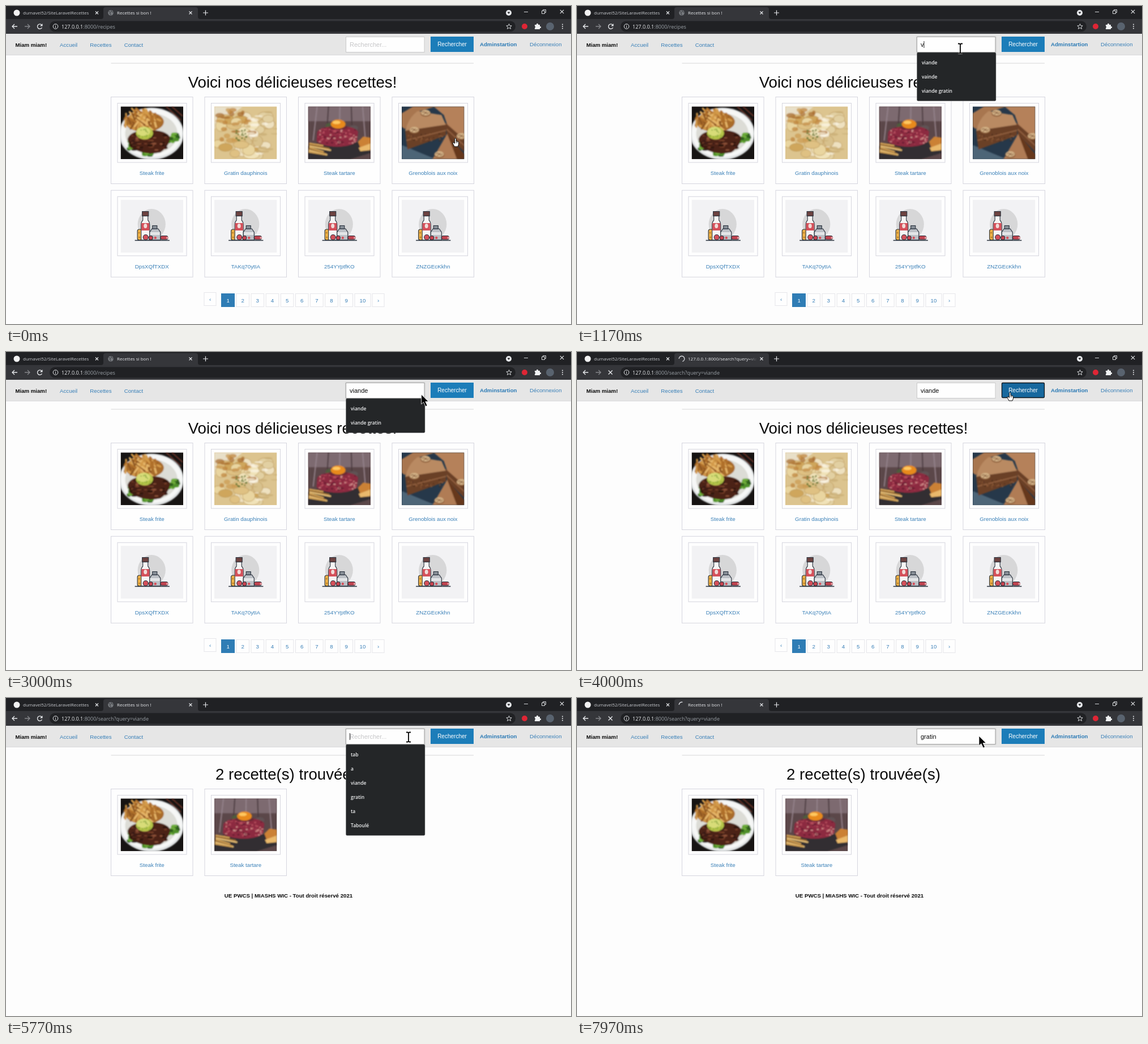
These frames come from a looping animation (998 by 561 pixels, 8000 ms). An HTML page:

```html
<!DOCTYPE html>
<html lang="fr">
<head>
<meta charset="utf-8">
<title>Recettes</title>
<style>
html, body { margin: 0; width: 100%; height: 100%; overflow: hidden; background: #fdfdfd; }
svg { display: block; }
#stage { width: 998px; height: 561px; font-family: "Liberation Sans", Arial, sans-serif; }
.ui { font-family: "Open Sans", "Noto Sans", sans-serif; }
.mid { text-anchor: middle; }
.b { font-weight: 700; }
text { white-space: pre; }
</style>
</head>
<body>
<svg id="stage" viewBox="0 0 998 561"></svg>
<script>
const LOOP = 8000;
const LINK = '#3a80b8', INK = '#0b0b0b', LIGHT = '#e8eaed';

const rect = (x, y, w, h, fill, more = '') => `<rect x="${x}" y="${y}" width="${w}" height="${h}" fill="${fill}" ${more}/>`;
const oval = (x, y, rx, ry, fill, more = '') => `<ellipse cx="${x}" cy="${y}" rx="${rx}" ry="${ry}" fill="${fill}" ${more}/>`;
const dot = (x, y, r, fill, more) => oval(x, y, r, r, fill, more);
const shape = (d, fill, more = '') => `<path d="${d}" fill="${fill}" ${more}/>`;
const line = (d, color, w = 1, more = '') => shape(d, 'none', `stroke="${color}" stroke-width="${w}" ${more}`);
const text = (x, y, s, size, fill, more = '') => `<text x="${x}" y="${y}" font-size="${size}" fill="${fill}" ${more}>${s}</text>`;
const group = (id, body, more = '') => `<g id="${id}" ${more}>${body}</g>`;
const repeat = (n, fn) => Array.from({ length: n }, (_, i) => fn(i)).join('');

function random(seed) {
  return (a = 0, b = 1) => {
    seed = (seed * 16807) % 2147483647;
    return +(a + (b - a) * seed / 2147483647).toFixed(1);
  };
}
const pick = (list, i) => list[i % list.length];

// Dishes, each on a 110 x 93 field
const photo = (back, body) => rect(0, 0, 110, 93, back) + `<g filter="url(#soft)">${body}</g>`;

function steakFries() {
  const r = random(91);
  const leaves = (n, x, y) => repeat(n, i => oval(x + r(-8, 8), y + r(-7, 7), r(3, 6), r(2, 4), pick(['#4f8f2a', '#6fae3a', '#2f611d'], i)));
  return photo('#171413', line('M80 0L106 24M90 0L109 17', '#6d3328', 2)
    + oval(54, 48, 57, 46, '#dfe2e3') + oval(54, 47, 54, 43, '#f6f7f6') + oval(54, 48, 46, 36, '#dcdcd6')
    + leaves(14, 92, 55) + leaves(14, 46, 80) + leaves(8, 18, 68)
    + oval(42, 27, 34, 18, '#a96c2b')
    + repeat(64, i => {
      const x = r(8, 62), y = r(3, 36);
      return line(`M${x} ${y}l${r(-6, 18)} ${r(5, 13)}`, pick(['#d39a49', '#b0702a', '#e6b669', '#8f5722'], i), 3.4, 'stroke-linecap="round"');
    })
    + shape('M12 58Q16 43 44 42Q78 40 87 54Q86 70 70 81Q42 87 17 72Z', '#4c2419')
    + repeat(50, i => oval(r(17, 80), r(50, 77), r(2, 5), r(1, 2.2), pick(['#753c28', '#2c130e', '#8d5138', '#3a1a12'], i)))
    + oval(42, 47, 15, 11, '#b5c548') + oval(40, 44, 12, 8, '#d8dc78')
    + repeat(16, () => dot(r(30, 53), r(39, 55), 1, '#759a30')));
}
function gratin() {
  const r = random(37);
  const lump = (x, y, colors, i) => oval(x, y, r(8, 15), r(6, 11), pick(colors, i), 'stroke="#b99455" stroke-width=".8"');
  return photo('#dcc48f', shape('M0 0H50L0 40Z', '#e8dfc8')
    + repeat(16, i => lump(r(50, 106), r(8, 88), ['#eee1c0', '#e2d0a2', '#f3ead3', '#d8c18d'], i))
    + repeat(18, i => lump(r(4, 66), r(12, 86), ['#dfc183', '#e9d5a0', '#cfa65c', '#f0e2b8'], i))
    + repeat(22, i => oval(r(6, 70), r(6, 60), r(3, 9), r(2, 5), pick(['#bd8139', '#cb9850', '#a66a2b'], i), 'opacity=".7"'))
    + repeat(20, i => oval(r(58, 108), r(10, 86), r(4, 9), r(1, 3), pick(['#fbf5e6', '#c7ac73'], i), 'opacity=".7"'))
    + repeat(20, () => dot(r(38, 57), r(40, 60), r(.8, 2), '#6d7b39')));
}
function tartare() {
  const r = random(53);
  return photo('#5b4749', rect(0, 0, 110, 26, '#7d6a70')
    + repeat(7, i => line(`M${i * 20 - 4} 0L${i * 23 - 14} 60`, pick(['#4a393e', '#94828a'], i), 2))
    + shape('M0 70L28 60L104 64L110 82L74 93H0Z', '#302d30')
    + oval(38, 34, 7, 5, '#4d5b3c') + oval(80, 38, 8, 5, '#5f5254')
    + shape('M16 46Q18 36 52 34Q84 35 88 45L86 61Q78 70 52 71Q22 70 15 61Z', '#8c2a40')
    + repeat(110, i => oval(r(18, 85), r(38, 67), r(1, 2.6), r(.8, 1.8), pick(['#b9505f', '#651c30', '#a23b50', '#cf8f8b'], i)))
    + oval(53, 37, 17, 4, '#6d2a35') + oval(53, 31, 13, 8, '#e88a1c') + oval(50, 28, 7, 3, '#ffc85e')
    + repeat(7, i => line(`M${r(0, 6)} ${65 + i * 2.5}l${r(20, 36)} ${r(4, 9)}`, pick(['#d2a256', '#94662f', '#e3bc75'], i), 2.8, 'stroke-linecap="round"'))
    + shape('M88 62L97 53L110 55V65L92 73Z', '#cb8135') + shape('M89 73L110 65V77L92 79Z', '#eab96c'));
}
function walnutCake() {
  const r = random(71);
  const nut = (x, y) => oval(x, y + 1, 9, 6, '#8a5b38') + oval(x, y, 8, 5, '#d8b78b')
    + line(`M${x - 6} ${y}q3 -4 6 0t6 -1M${x - 4} ${y + 3}l7 -5`, '#7d5435', 1.2);
  const crumbs = (n, x, y, w, h) => repeat(n, i => dot(r(x, x + w), r(y, y + h), r(.7, 1.5), pick(['#8d5a38', '#4e2c1a'], i)));
  return photo('#26384a', shape('M0 68L60 93H0Z', '#4d6577')
    + shape('M0 12L20 0H60L26 10L6 40L0 36Z', '#a87650')
    + shape('M56 0H110V58L82 38L74 15Z', '#b5815a') + shape('M76 28L110 58V80L80 50Z', '#6a3f27')
    + shape('M6 43Q12 20 28 8L70 15L78 33Z', '#b98a62') + shape('M6 43L78 32V51L10 76Z', '#6b4128')
    + line('M8 60L78 42M79 40L110 69', '#92603f', 2) + crumbs(40, 12, 46, 60, 16)
    + shape('M80 48L54 93H100Z', '#b07c55') + shape('M80 48L110 84V93H97Z', '#66391f')
    + nut(22, 41) + nut(42, 11) + nut(66, 84) + nut(105, 52));
}
function groceries() {
  const edge = 'stroke="#28313c" stroke-width="1.1"';
  return rect(0, 0, 110, 93, '#f2f2f4') + oval(54.5, 43, 24.5, 27, '#d7d7d8')
    + rect(29.5, 52, 17, 19, '#edb147', `rx="3" ${edge}`) + dot(32.5, 58, 1.5, '#b97f2c') + dot(33, 66, 1.5, '#b97f2c')
    + shape('M39 28H48V36Q51 39 51 44V71H36V44Q36 39 39 36Z', '#f6f5f4', edge)
    + rect(38, 20.5, 11, 8, '#6d4341', edge) + rect(36.5, 41, 14, 13, '#d4505a') + oval(43.5, 46, 3, 4, '#f1dcd9')
    + shape('M51 71V57L55 51H66L70 57V71Z', '#bcc0c6', edge) + rect(56, 45.5, 8, 5.5, '#8b929a', edge)
    + rect(52, 57, 17, 5, '#e4e6e8') + dot(61, 67, 2.2, '#d4505a')
    + dot(44, 66, 4.5, '#d4505a', edge) + dot(53, 67, 3.5, '#c9434f', edge)
    + rect(70, 63.5, 13, 6.5, '#c0434f', `rx="3" ${edge}`) + dot(82, 67, 2, '#e39aa0')
    + line('M25 71.5H86', '#28313c', 1.4);
}

function card(col, row, title, art) {
  const x = 185.5 + col * 165.5, y = 160.5 + row * 164.7;
  const frame = 'stroke="#d5d5de" stroke-width="1"';
  return rect(x, y, 144.5, 153, '#fefefe', frame) + rect(x + 11.5, y + 11, 122, 104.5, '#fefefe', frame)
    + `<svg x="${x + 17}" y="${y + 16.8}" width="110.5" height="93" viewBox="0 0 110 93" preserveAspectRatio="none">${art}</svg>`
    + text(x + 72.3, y + 137.3, title, 9.75, LINK, 'class="mid"');
}
const heading = s => text(506, 144, s, 27.65, INK, 'class="mid"');

function pager() {
  const cell = (x, w, label, y = 507.5) => rect(x - w / 2, y, w, 23, '#fefefe', 'stroke="#e6e6ea"')
    + text(x, y + 15.2, label, 9.7, LINK, 'class="mid"');
  return cell(360.5, 21, '‹', 505.5) + repeat(9, i => cell(392 + i * 26.15, 22.5, i + 1))
    + rect(380, 507, 24, 24, '#2f7db5') + text(392.2, 522.7, 1, 9.7, '#fff', 'class="mid"')
    + cell(630, 28, 10) + cell(657.5, 21, '›');
}

function browser() {
  const cross = (x, y, r) => line(`M${x - r} ${y - r}l${2 * r} ${2 * r}m0 ${-2 * r}l${-2 * r} ${2 * r}`, LIGHT, 1.1);
  return rect(0, 0, 998, 49, '#202124')
    + shape('M168 23Q172 23 172 19V6Q172 2 176 2H335Q339 2 339 6V19Q339 23 343 23Z', '#35363a')
    + rect(0, 23, 998, 26, '#35363a') + rect(77, 26.5, 823, 19, '#202124', 'rx="9.5"')
    + dot(19, 12, 5.5, '#f2f2f2')
    + text(30, 14.8, 'dumavel52/SiteLaravelRecettes', 8, '#c6c9cd', 'class="ui"')
    + cross(160.5, 12, 2.5) + cross(326, 12, 2.5) + line('M348 12h9M352.5 7.5v9', LIGHT, 1.2)
    + dot(888, 12, 5, LIGHT) + shape('M885.5 10.5h5l-2.5 3.5Z', '#202124')
    + line('M915 10.5h7M946.5 8.5h5v5h-5ZM948.5 8.5v-2h5v5h-2', LIGHT, .9) + cross(982, 10, 3.2)
    + line('M20 36H11M15 32L11 36L15 40', LIGHT, 1.3) + line('M33 36H42M38 32L42 36L38 40', '#85878b', 1.3)
    + group('reload', line('M63 33.5A4.2 4.2 0 1 0 63.5 38', LIGHT, 1.3) + shape('M64.5 31v4.5h-4.5Z', LIGHT))
    + group('stop', line('M55.5 32.5l7 7m0-7l-7 7', LIGHT, 1.4))
    + dot(87.5, 36, 4.3, 'none', `stroke="${LIGHT}"`) + line('M87.5 35.5v3M87.5 33.3v1', LIGHT)
    + `<text x="98" y="39.5" font-size="9.05" fill="${LIGHT}" class="ui">127.0.0.1<tspan fill="#9aa0a6" id="url"></tspan></text>`
    + line('M888.5 31.5l1.3 3.2 3.4.2-2.6 2.2.9 3.3-3-1.9-3 1.9.9-3.3-2.6-2.2 3.4-.2Z', LIGHT, .9)
    + dot(916, 36, 5, '#df2635')
    + shape('M934 33h3a1.6 1.6 0 1 1 3 0h3v3a1.6 1.6 0 1 1 0 3v2h-9v-2.5a1.6 1.6 0 0 0 0-3Z', '#f1f3f4')
    + dot(961, 36, 7, '#59636f')
    + repeat(3, i => dot(983, 32.5 + i * 3.5, 1, LIGHT))
    + group('globe', dot(185, 12, 4.8, '#777a7e') + line('M181.5 9.5l3 1.5-1 2.5 2 2.5M185.5 7.5l1 2.5 3 1', '#404247', 1.2))
    + line('', '#d8dade', 1.4, 'id="spinner"')
    + `<svg x="195" y="0" width="122" height="23">${text(1, 14.8, '', 8, LIGHT, 'class="ui" id="tab"')}</svg>`
    + rect(302, 3, 16, 19, 'url(#fade)');
}

function navigation() {
  return rect(0, 49, 998, 38, '#e6e6e6') + rect(0, 86, 998, 1, '#d9d9dc')
    + text(16.5, 71.5, 'Miam miam!', 9.65, INK, 'class="b"')
    + text(95, 71.5, 'Accueil', 9.7, LINK) + text(148.3, 71.5, 'Recettes', 9.7, LINK) + text(208.7, 71.5, 'Contact', 9.7, LINK)
    + rect(600.5, 54.5, 138.5, 27, '#fefefe', 'id="field"')
    + text(607, 72, '', 11, INK, 'id="query"') + rect(607, 62, .9, 12, '#111', 'id="caret"')
    + rect(750.5, 54.5, 75, 26, '', 'id="button"')
    + text(788, 71.3, 'Rechercher', 10, '#fff', 'class="mid"')
    + text(837, 71.3, 'Adminstartion', 9.67, '#2b7ab5', 'class="b"') + text(925, 71.3, 'Déconnexion', 9.7, LINK);
}

const beam = 'M-4 -8.5H-1.5L0 -7.5L1.5 -8.5H4M0 -7.5V7.5M-4 8.5H-1.5L0 7.5L1.5 8.5H4';
const pointers = group('hand', shape('M-1.5 -6Q0 -7.5 1 -6V-1.5Q5 -1.5 5.5 .5V4Q5 6 4 8H-2Q-4 4 -5 2Q-5 0 -3 1L-1.5 2.5Z', '#fff', 'stroke="#111"')
    + line('M1 -1v3M3 -.8v3', '#111', .7))
  + group('beam', line(beam, '#fff', 2.8) + line(beam, '#000', 1.8))
  + group('arrow', shape('M0 0V17L4 13.5L7.5 21L10.5 19.5L7.2 12.5H12.5Z', '#000', 'stroke="#fff" stroke-width=".8"'));

const dishes = [['Steak frite', steakFries()], ['Gratin dauphinois', gratin()], ['Steak tartare', tartare()], ['Grenoblois aux noix', walnutCake()]];
const extras = ['DpsXQfTXDX', 'TAKq70ytIA', '254YYptfKO', 'ZNZGEcKkhn'];
const row = list => list.map(([name, art], i) => card(i, 0, name, art)).join('');

document.getElementById('stage').innerHTML =
  `<defs><linearGradient id="fade"><stop stop-color="#35363a" stop-opacity="0"/><stop offset="1" stop-color="#35363a"/></linearGradient>
   <filter id="soft"><feGaussianBlur stdDeviation=".8"/></filter>
   <filter id="glow" x="-10%" y="-30%" width="120%" height="160%"><feDropShadow dx="0" dy="0" stdDeviation="1.2" flood-color="#b4b4b4"/></filter></defs>`
  + rect(0, 0, 998, 561, '#fdfdfd') + line('M185.5 101H826', '#d6d6d8')
  + group('catalogue', heading('Voici nos délicieuses recettes!') + row(dishes)
    + extras.map((name, i) => card(i, 1, name, groceries())).join('') + pager())
  + group('results', heading('2 recette(s) trouvée(s)') + row([dishes[0], dishes[2]])
    + text(499, 351.7, 'UE PWCS | MIASHS WIC - Tout droit réservé 2021', 9.66, INK, 'class="mid b"'))
  + browser() + navigation() + group('menu', '') + group('pointer', pointers);

const $ = Object.fromEntries([...document.querySelectorAll('#stage [id]')].map(e => [e.id, e]));
const show = (el, on) => { el.style.display = on ? '' : 'none'; };
const put = (el, s) => { if (el.textContent !== s) el.textContent = s; };
const set = (el, attrs) => Object.entries(attrs).forEach(([k, v]) => el.setAttribute(k, v));
const at = (steps, t) => steps.filter(s => s[0] <= t).pop()[1];

const recent = ['tab', 'a', 'viande', 'gratin', 'ta', 'Taboulé'];
const typed = [[0, ''], [1090, 'v'], [1330, 'vi'], [1530, 'via'], [1730, 'vian'], [1900, 'viand'], [2070, 'viande'],
  [4420, ''], [6170, 'g'], [6400, 'gr'], [6600, 'gra'], [6830, 'grat'], [7030, 'grati'], [7200, 'gratin']];
const menus = [[0, []], [770, recent], [1090, ['viande', 'vainde', 'viande gratin']], [1330, ['viande', 'viande gratin']],
  [3450, []], [5600, recent], [6170, ['gratin']], [7600, []]];
const kinds = [[0, 'hand'], [330, 'arrow'], [560, 'beam'], [2900, 'arrow'], [3070, 'hand'], [5230, 'arrow'], [5330, 'beam'], [7600, 'arrow']];
const path = [[0, 794, 240], [120, 794, 240], [680, 677, 75], [2620, 677, 75], [3250, 765, 78], [5070, 765, 78], [5480, 711, 69], [LOOP, 711, 69]];

function pointerAt(t) {
  const i = path.findIndex(p => p[0] > t);
  const [t0, x0, y0] = path[i - 1], [t1, x1, y1] = path[i];
  const u = (t - t0) / (t1 - t0), e = u * u * (3 - 2 * u);
  return [x0 + (x1 - x0) * e, y0 + (y1 - y0) * e];
}

function spinnerArc(age) {
  const r = 4.8, from = Math.PI, sweep = Math.min(.75, age / 640) * Math.PI * 2;
  const p = k => `${185 + r * Math.cos(k)} ${12 + r * Math.sin(k)}`;
  return `M${p(from)}A${r} ${r} 0 ${sweep > Math.PI ? 1 : 0} 1 ${p(from + sweep)}`;
}

function drawMenu(items) {
  const key = items.join();
  if ($.menu.dataset.key === key) return;
  $.menu.dataset.key = key;
  $.menu.innerHTML = items.length ? rect(600.5, 82, 139.5, items.length * 25 + 10.5, '#242628', 'rx="2" stroke="#77797b" stroke-width=".5"')
    + items.map((s, i) => text(609, 103.2 + i * 25, s, 8.5, '#f1f2f3', 'class="ui" font-weight="600"')).join('') : '';
}

function draw(t) {
  const found = t >= 4420, searching = t >= 3550 && !found;
  const age = searching ? t - 3550 : t - 7780, loading = searching || t >= 7780;
  const focused = (t >= 770 && t < 3450) || t >= 5600;
  const hover = t >= 3130 && !found, pressed = t >= 3450 && !found;
  const query = at(typed, t), kind = at(kinds, t);
  const [x, y] = pointerAt(t);

  show($.catalogue, !found);
  show($.results, found);
  show($.reload, !loading);
  show($.stop, loading);
  show($.globe, !loading);
  show($.spinner, loading);
  if (loading) set($.spinner, { d: spinnerArc(age) });
  put($.url, searching || found ? ':8000/search?query=viande' : ':8000/recipes');
  put($.tab, searching ? '127.0.0.1:8000/search?query=viande' : 'Recettes si bon !');

  put($.query, query || 'Rechercher...');
  set($.query, { fill: query ? INK : '#c6c6c8' });
  set($.field, { stroke: focused ? '#a5a5a5' : '#cacaca', filter: focused ? 'url(#glow)' : 'none' });
  const lastKey = Math.max(...[0, 770, 5600, ...typed.map(s => s[0])].filter(k => k <= t));
  show($.caret, focused && (t - lastKey) % 1060 < 530 && t < 7780);
  set($.caret, { x: 607 + (query ? $.query.getComputedTextLength() : 0) });
  const face = hover ? '#17689e' : '#1c7db9';
  set($.button, { fill: face, stroke: pressed ? '#10171d' : face, 'stroke-width': pressed ? 1.3 : 1, rx: pressed ? 1.5 : 0 });

  drawMenu(at(menus, t));
  for (const k of ['hand', 'beam', 'arrow']) show($[k], k === kind);
  const lift = kind === 'arrow' ? -2 : 0;
  set($.pointer, { transform: `translate(${x + lift / 2} ${y + lift})` });
}

const start = performance.now();
function tick() {
  draw((performance.now() - start) % LOOP);
  requestAnimationFrame(tick);
}
tick();
</script>
</body>
</html>
```
